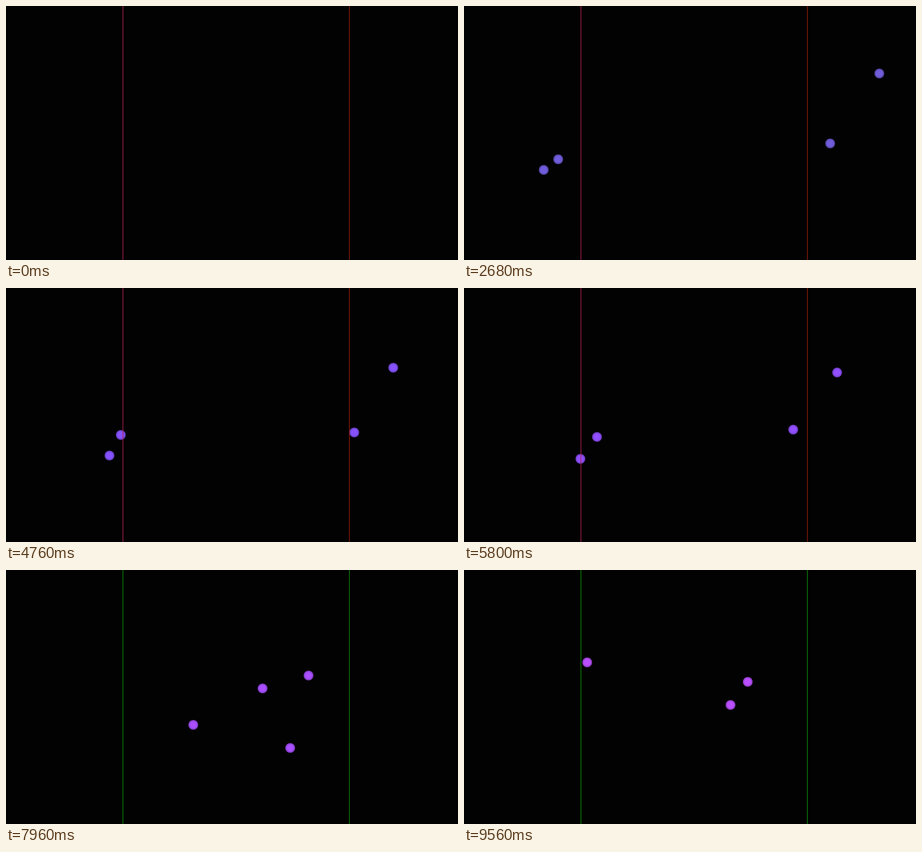
Write an HTML page with a canvas that moves like this. It is 998 by 561 pixels and loops after 9600 ms.

```html
<!DOCTYPE html>
<html>
<head>
<meta charset="utf-8">
<style>
  html, body { margin: 0; width: 100%; height: 100%; overflow: hidden; background: #020202; }
  canvas { display: block; }
</style>
</head>
<body>
<canvas id="stage" width="998" height="561"></canvas>
<script>
const ctx = document.getElementById('stage').getContext('2d');
const LOOP = 9600, STEP = 40, RADIUS = 10.8, RELEASE = 5880;

// All balls share these moments: enter, slow down at a gate, then cross the middle
const times = [480, 1320, 2680, 4760, 5440, 6640, 7960, 9560];
const paths = [
  [[-250, 250], [48.5, 297], [208, 338.5], [253.5, 324.5], [274, 322], [365.5, 352], [627.5, 393], [1180, 428]],
  [[-6, 362], [96.5, 366], [176, 362], [228.5, 370], [238, 383], [313.5, 356.5], [413.5, 342], [588.5, 298]],
  [[1004, 340], [882, 314], [808.5, 303.5], [769, 319], [746, 321], [674, 288], [566.5, 261.5], [272, 204]],
  [[1120, 70], [1011, 112], [917, 149], [855, 176], [842, 182], [770.5, 200], [668, 233], [626.5, 247]]
];

function velocity(path, i, axis) {
  const from = Math.max(i - 1, 0), to = Math.min(i + 1, times.length - 1);
  return (path[to][axis] - path[from][axis]) / (times[to] - times[from]);
}

// Cubic Hermite curve through the points of a path
function position(path, t) {
  const next = times.findIndex(time => time >= t) || 1, i = next - 1;
  const span = times[next] - times[i], u = (t - times[i]) / span, v = 1 - u;
  return [0, 1].map(axis =>
    v * v * (1 + 2 * u) * path[i][axis] + u * u * (3 - 2 * u) * path[next][axis] +
    span * u * v * (v * velocity(path, i, axis) - u * velocity(path, next, axis)));
}

// Balls drift from slate blue to violet
const tint = t => [82 + 0.0109 * t, Math.max(79, 106 - 0.005 * t), Math.min(255, 175 + 0.0165 * t)];
const css = (rgb, shade = 1) => `rgb(${rgb.map(c => Math.round(c * shade))})`;

function drawBall([x, y], rgb) {
  const fill = ctx.createRadialGradient(x, y, 0, x, y, RADIUS);
  fill.addColorStop(0.6, css(rgb));
  fill.addColorStop(1, css(rgb, 0.7));
  ctx.fillStyle = fill;
  ctx.beginPath();
  ctx.arc(x, y, RADIUS, 0, 2 * Math.PI);
  ctx.fill();
}

function drawGate(x, color) {
  ctx.fillStyle = color;
  ctx.fillRect(x, 0, 1.5, 561);
}

function draw(t) {
  ctx.fillStyle = '#020202';
  ctx.fillRect(0, 0, 998, 561);
  if (t >= times[0]) paths.forEach(path => drawBall(position(path, t), tint(t)));
  const open = t >= RELEASE;
  drawGate(257.5, open ? '#0a8a0a' : '#a8204e');
  drawGate(757.5, open ? '#0a8a0a' : '#961c0a');
}

function tick() {
  draw(Math.floor(performance.now() % LOOP / STEP) * STEP);
  requestAnimationFrame(tick);
}
tick();
</script>
</body>
</html>
```
